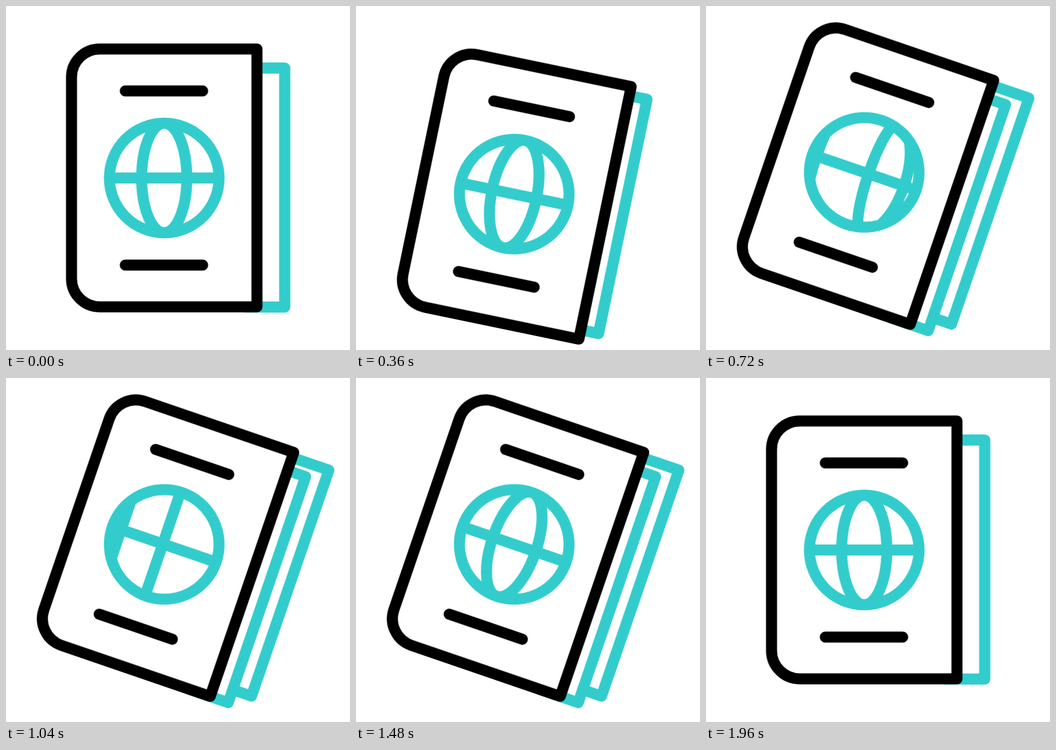
Animation, 640 px wide and 640 px high, one loop 2 s. Source, as an HTML page:

```html
<!DOCTYPE html>
<html lang="en">
<head>
<meta charset="utf-8">
<title>Passport</title>
<style>
  html, body { margin: 0; width: 100%; height: 100%; overflow: hidden; background: #fff; }
  svg { display: block; width: 100vw; height: 100vh; }
  path, circle { fill: none; stroke-width: 20.5; stroke-linecap: round; stroke-linejoin: round; }
  .ink { stroke: #000; }
  .teal { stroke: #33cccc; }
  .paper { fill: #fff; }
  #book, .page { animation: 2s cubic-bezier(.333, 0, .667, 1) infinite; }
  #book { animation-name: tilt; }
  #back { animation-name: back; }
  #front { animation-name: front; }

  @keyframes tilt {
    0%, 98%, 100% { transform: translate(294.4px, 320px) rotate(0deg); }
    16%, 18%, 84% { transform: translate(294.4px, 350px) rotate(11.7deg); }
    28%, 74% { transform: translate(294.4px, 309.6px) rotate(18.9deg); }
  }
  @keyframes back {
    0%, 98%, 100% { transform: translate(0, 0); }
    16%, 18%, 84% { transform: translate(-18px, -18px); }
    28%, 74% { transform: translate(21px, -25.5px); }
  }
  @keyframes front {
    0%, 98%, 100% { transform: translate(0, 0); }
    16%, 18%, 84% { transform: translate(-18px, -18px); }
    28%, 74% { transform: translate(-16px, 0); }
  }
</style>
</head>
<body>
<svg viewBox="0 0 640 640">
  <clipPath id="disc"><circle r="103"/></clipPath>
  <g id="book">
    <path id="back" class="page teal paper" d="M150 -204.5H224V240H150"/>
    <path id="front" class="page teal paper" d="M150 -204.5H224V240H150"/>
    <path class="ink paper" d="M172.5 -240V239.7H-120A52.5 52.5 0 0 1 -172.5 187.2V-187.5A52.5 52.5 0 0 1 -120 -240Z"/>
    <path class="ink" d="M-72.5 -162H71.5M-72.5 162H71.5"/>
    <g id="meridians" class="teal" clip-path="url(#disc)"></g>
    <path class="teal" d="M-102 0H102"/>
    <circle class="teal" r="102"/>
  </g>
</svg>
<script>
  const R = 102, K = 0.5523;

  // Half ellipse from pole to pole: x at the equator, and how far it bulges.
  const arc = ([x, bulge]) => {
    const pole = x - bulge, mid = pole + K * bulge, h = R * K;
    return `path("M${pole} ${-R}C${mid} ${-R} ${x} ${-h} ${x} 0C${x} ${h} ${mid} ${R} ${pole} ${R}")`;
  };

  // One turn of the globe, split at the moments where the bulge changes pace.
  const stops = [
    [360, 'cubic-bezier(.394, 0, .7, .434)'],
    [720, 'linear'],
    [1040, 'cubic-bezier(.267, .573, .583, 1)'],
    [1480, 'linear']
  ];

  // [x, bulge] at each stop; the first two leave, the last two arrive.
  const meridians = [
    [[-42, -42], [8, -19], [108, 0], [155, 20]],
    [[42, 42], [78, 44], [150, 44], [190, 44]],
    [[-230, 0], [-175, 0], [-85, 0], [-42, -42]],
    [[-147, -34], [-94, -20], [-3, 0], [42, 42]]
  ];

  for (const poses of meridians) {
    const path = document.createElementNS('http://www.w3.org/2000/svg', 'path');
    document.getElementById('meridians').append(path);
    const frames = stops.map(([ms, easing], i) => ({ offset: ms / 2000, easing, d: arc(poses[i]) }));
    frames.unshift({ offset: 0, d: arc(poses[0]) });
    frames.push({ offset: 1, d: arc(poses[3]) });
    path.animate(frames, { duration: 2000, iterations: Infinity });
  }
</script>
</body>
</html>
```
